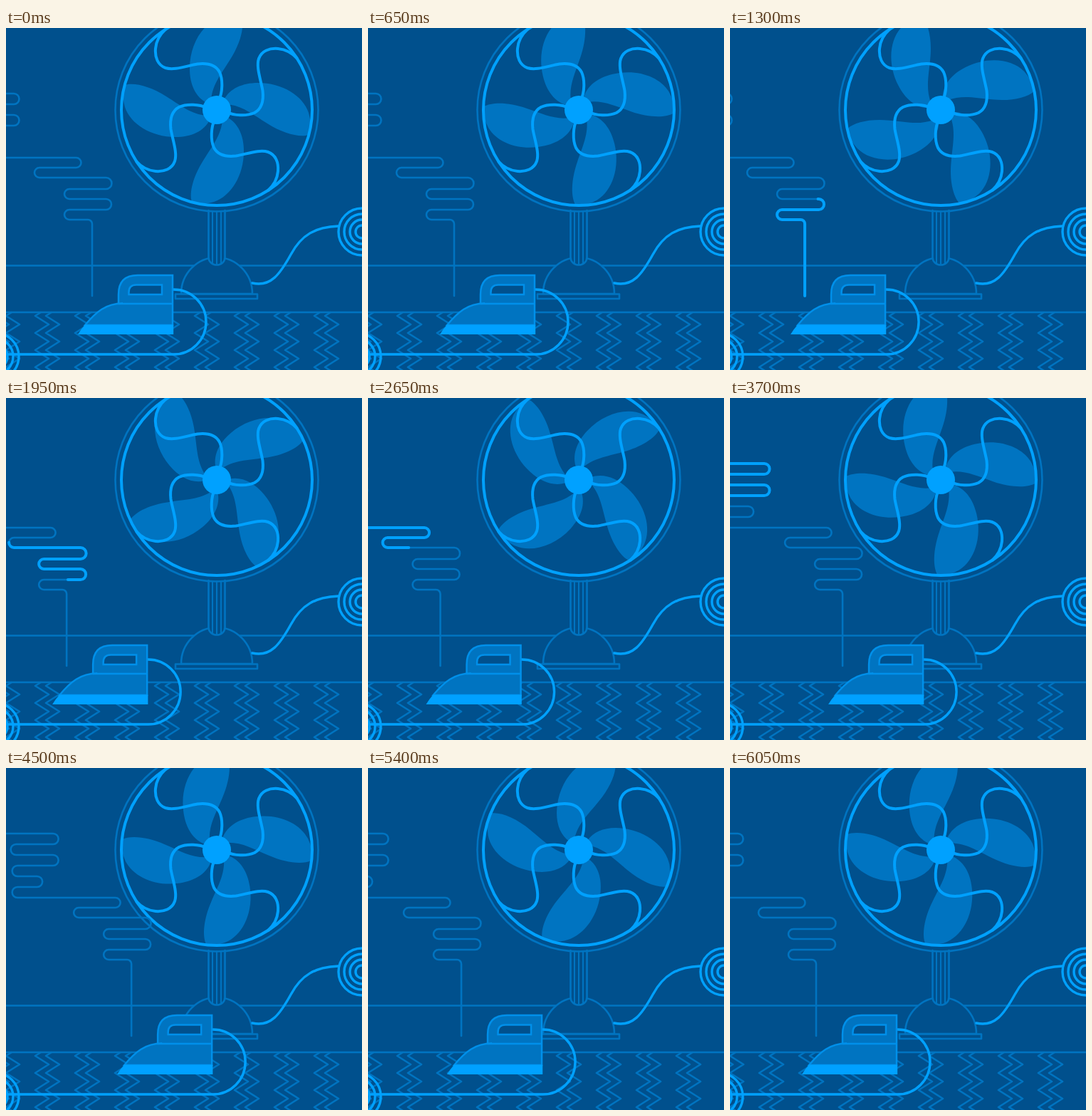
Animation of 500x480 px, one loop 6.1 s. Source, as an HTML page:

```html
<!DOCTYPE html>
<html lang="en">
<head>
<meta charset="utf-8">
<title>Fan and iron</title>
<style>
  html, body { margin: 0; width: 100%; height: 100%; overflow: hidden; background: #00508d; }
  svg { display: block; width: 500px; height: 480px; }
  .dim, .lit { fill: none; stroke-linejoin: round; stroke-linecap: round; }
  .dim { stroke: #0074c1; stroke-width: 2.6; }
  .lit { stroke: #00a1ff; stroke-width: 4; }
  .cord { stroke-width: 3.4; }
  .wall { fill: #00508d; }
  .mid { fill: #0074c1; }
  .hot { fill: #00a1ff; }
  .edge { stroke: #0090ea; stroke-width: 2.5; }
</style>
</head>
<body>
<svg viewBox="0 0 500 480">
  <rect class="wall" width="500" height="480"/>

  <!-- room and carpet -->
  <path class="dim" d="M0 333.500H500M0 399H500"/>
  <path class="dim" id="zigzag"/>

  <!-- stand -->
  <path class="dim" style="fill:#00508d" d="M246 373A50 51 0 0 1 346 373Z"/>
  <rect class="dim" x="238" y="373.5" width="115" height="6.5"/>
  <path class="dim" style="fill:#00508d" d="M284.500 256V322A11.500 10.500 0 0 0 307.500 322V256"/>
  <path class="dim" style="stroke-width:2" d="M290 257V331M296 257V331M302 257V331"/>

  <!-- right cord -->
  <path class="lit cord" d="M346 358C372 364 385 345 400 318C415 290 435 279 467 278"/>
  <g id="coils"></g>

  <!-- fan head -->
  <g transform="translate(296 115)">
    <circle class="dim" r="142.500"/>
    <g id="blades"></g>
    <g id="cage"></g>
    <circle class="lit" r="134"/>
    <circle class="hot" r="20"/>
  </g>

  <!-- iron with steam and cord -->
  <g id="iron">
    <path class="dim steam"/>
    <path class="lit steam" id="pulse"/>
    <path class="lit cord" d="M234 367H235.500A45.500 45.500 0 0 1 235.500 458H-90"/>
    <path class="mid edge" d="M158 387V374Q158 347 185 347H234V417H111C126 399 140 386.500 164 386.500Z"/>
    <path class="edge" d="M158 387H234"/>
    <path class="wall edge" d="M172.500 374V371Q172.500 360.500 183 360.500H219V374Z"/>
    <path class="hot" d="M101 430Q105 423 111 416.500H235.200V430Z"/>
  </g>
</svg>
<script>
const LOOP = 6100, STEP = 50;
const $ = id => document.getElementById(id);

// Four copies of a path, a quarter turn apart
const fourfold = (cls, d) => [0, 90, 180, 270]
  .map(a => `<path class="${cls}" d="${d}" transform="rotate(${a})"/>`).join('');

$('blades').innerHTML = fourfold('mid',
  'M14 10C30 18 38 36 38 58C38 92 20 121 -4 129Q-20 134 -35 129C-39 116 -33 93 -19 71C-6 50 6 36 8 14Z');
$('cage').innerHTML = fourfold('lit',
  'M-3 14C-8 24 -9 42 -4 53C2 64 14 66 27 64.5C42 62 60 55 72 59C83 63 87 74 86 86C85 97 80 106 72 113');

$('coils').innerHTML = [[500, 286], [-15, 461]].map(([x, y]) =>
  [33, 25, 17, 9].map(r => `<circle class="lit cord" cx="${x}" cy="${y}" r="${r}"/>`).join('')).join('');

function zigzag() {
  let d = '';
  for (let col = -1; col < 8; col++) {
    for (const gap of [0, 15]) {
      const x = 41 + col * 56 + gap;
      d += `M${x + 8} 399`;
      for (let i = 0; i < 8; i++) d += `L${x + (i % 2 ? 19 : 0)} ${404 + i * 12}`;
    }
  }
  return d;
}
$('zigzag').setAttribute('d', zigzag());

// Steam runs upward, turning at each x between successive rows
function steam() {
  const rows = [269, 255, 240, 226, 210, 196, 182, 167, 152, 137, 122, 107, 92];
  const turns = [89, 140.5, 89, 140.5, 47, 98.5, -39, -11.5, -39, 11, -41, 11];
  let d = 'M121 376V275A6 6 0 0 0 115 269';
  turns.forEach((x, i) => {
    const r = (rows[i] - rows[i + 1]) / 2;
    d += `H${x}A${r} ${r} 0 0 ${i % 2 ? 0 : 1} ${x} ${rows[i + 1]}`;
  });
  return d + 'H-200';
}
document.querySelectorAll('.steam').forEach(p => p.setAttribute('d', steam()));

// Iron positions: time, offset
const slide = [[0, 0], [700, 0], [2000, -36], [4400, 56], [5770, 0], [LOOP, 0]];

function offsetAt(t) {
  const i = slide.findIndex(([time]) => t < time);
  const [t0, x0] = slide[i - 1], [t1, x1] = slide[i];
  const p = (t - t0) / (t1 - t0);
  return x0 + (x1 - x0) * p * p * (3 - 2 * p);
}

function draw(t) {
  $('blades').setAttribute('transform', `rotate(${t / LOOP * 720})`);
  $('iron').setAttribute('transform', `translate(${offsetAt(t)} 0)`);

  const head = Math.max(0, 0.39 * (t - 700));
  const tail = Math.max(0, 0.364 * (t - 1423));
  const pulse = $('pulse');
  pulse.style.display = head > 0 && t < 4500 ? '' : 'none';
  pulse.setAttribute('stroke-dasharray', `${head - tail} 9999`);
  pulse.setAttribute('stroke-dashoffset', -tail);
}

const start = performance.now();
function tick() {
  const t = (performance.now() - start) % LOOP;
  draw(Math.floor(t / STEP) * STEP);
  requestAnimationFrame(tick);
}
tick();
</script>
</body>
</html>
```
